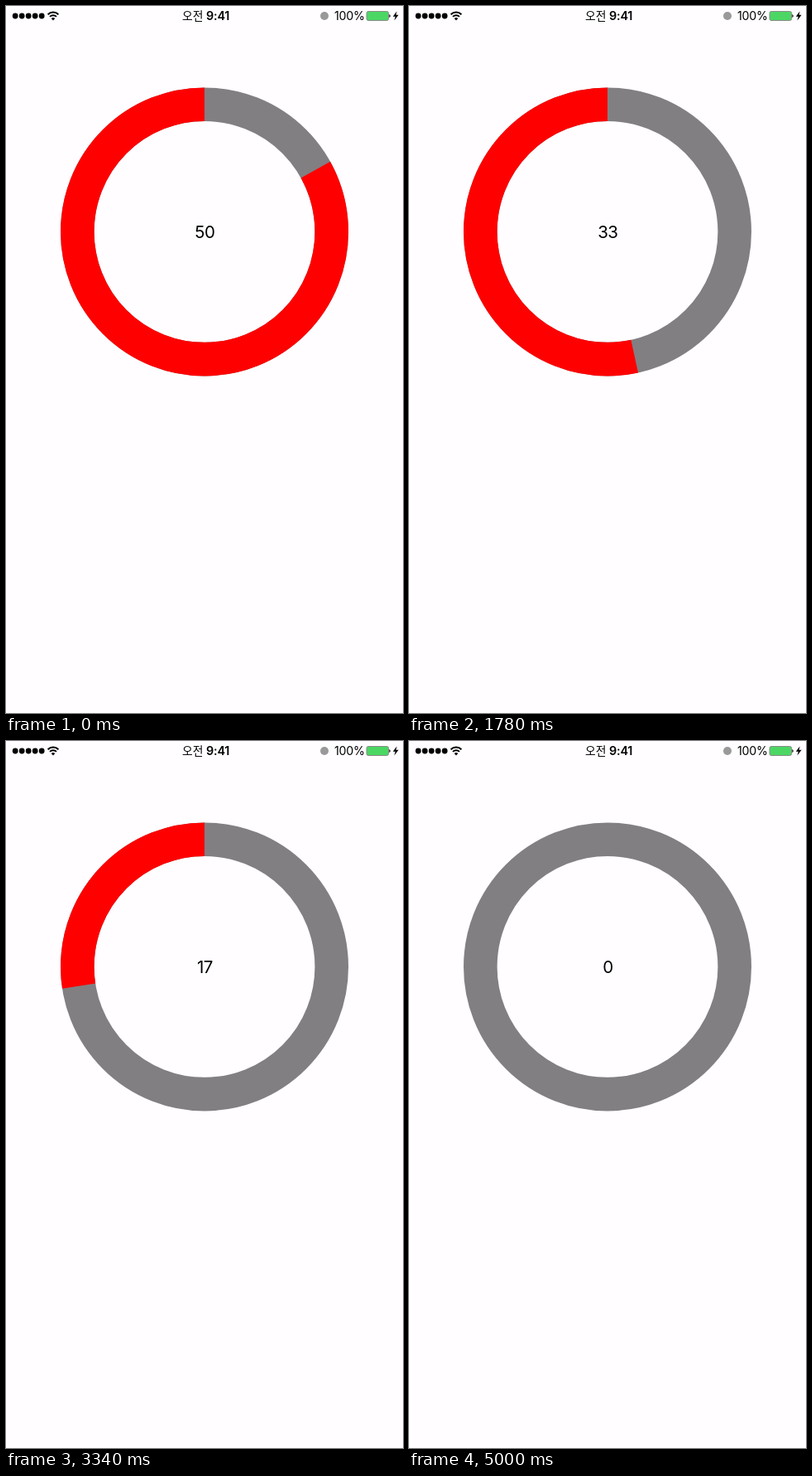
These frames come from a looping animation (480 px wide and 853 px high, 5.02 s). An HTML page:

```html
<!DOCTYPE html>
<html lang="ko">
<head>
<meta charset="utf-8">
<title>Countdown ring</title>
<style>
  html, body { margin: 0; width: 100%; height: 100%; overflow: hidden; background: #fffdff; }
  svg { display: block; width: 480px; height: 853px; }
  text { font-family: Inter, "Noto Sans CJK KR", "Noto Sans CJK", sans-serif; }
  .ring { fill: none; stroke-width: 40.6; }
</style>
</head>
<body>
<svg viewBox="0 0 480 853">
  <!-- status bar -->
  <path d="M11.2 12h32.1" stroke="#000" stroke-width="6.8" stroke-linecap="round" stroke-dasharray="0 8"/>
  <g fill="none" stroke="#000" stroke-width="2">
    <path d="M50.6 10.2a9 9 0 0 1 12.8 0M53 12.9a5.6 5.6 0 0 1 8 0"/>
  </g>
  <path d="M57 17.4l-2.3-2.3a3.2 3.2 0 0 1 4.6 0z"/>
  <text x="213" y="17" font-size="13.8" font-weight="500">오전</text>
  <text x="242" y="17" font-size="14.4" font-weight="600" letter-spacing="-.2">9:41</text>
  <circle cx="385" cy="12" r="5" fill="#999"/>
  <text x="397" y="17" font-size="14.2" letter-spacing="-.2">100%</text>
  <rect x="436" y="6.5" width="26.5" height="11" rx="2" fill="#4cd764" stroke="#8a8a8a"/>
  <path d="M463.3 10v4q1.4-.4 1.4-2t-1.4-2z"/>
  <path d="M472.6 6.3l-4.8 6.4h2.9l-1.3 4.8 5.2-6.7h-3.1z"/>

  <!-- dial -->
  <circle class="ring" cx="240" cy="272.4" r="153.7" stroke="#817f81"/>
  <circle class="ring" id="left" cx="240" cy="272.4" r="153.7" stroke="#f00"
          pathLength="360" transform="rotate(-90 240 272.4)"/>
  <text id="count" x="240.3" y="280" font-size="20.5" letter-spacing="-.6" text-anchor="middle">50</text>
</svg>
<script>
  const LOOP = 5020, STEP = 20;
  const left = document.getElementById('left');
  const count = document.getElementById('count');
  const start = performance.now();

  function draw(now) {
    const elapsed = Math.max(0, now - start) % LOOP;
    const t = Math.floor(elapsed / STEP) * STEP;
    const angle = 60.9 + t * 0.06; // degrees already used up
    left.setAttribute('stroke-dasharray', `0 ${angle} 360 0`);
    left.style.display = angle < 360 ? '' : 'none';
    count.textContent = Math.max(0, Math.ceil((360 - angle) / 6));
    requestAnimationFrame(draw);
  }
  draw(start);
</script>
</body>
</html>
```
